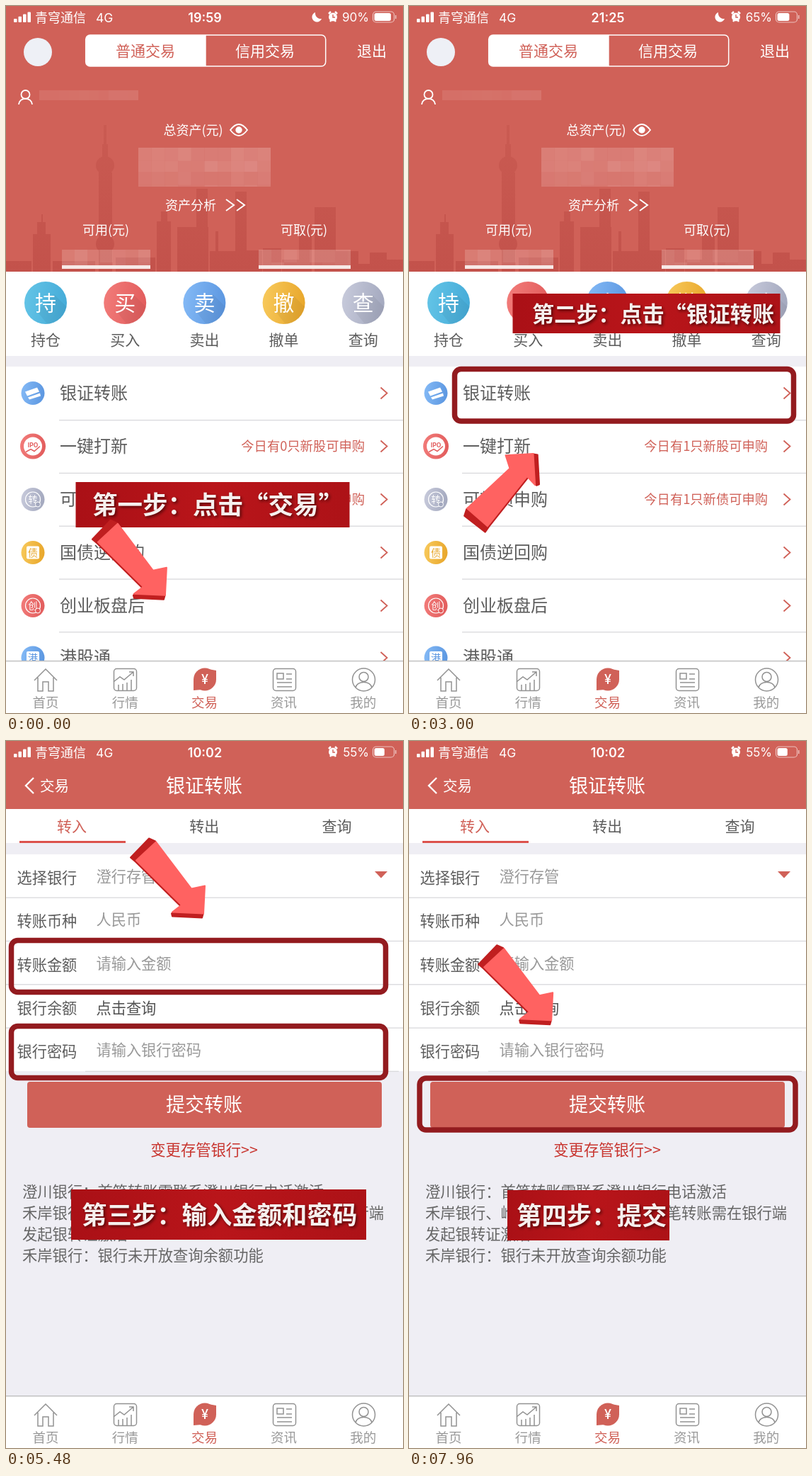
An HTML page with a canvas that plays this animation: 561 px wide and 998 px high, repeating every 8000 ms.

```html
<!DOCTYPE html>
<html lang="zh-CN">
<head>
<meta charset="utf-8">
<style>
html, body { margin: 0; width: 100%; height: 100%; overflow: hidden; background: #fff; }
canvas { display: block; }
</style>
</head>
<body>
<canvas id="stage" width="561" height="998"></canvas>
<script>
const c = document.getElementById('stage').getContext('2d');
const CJK = '"Noto Sans CJK SC", "Noto Sans CJK", sans-serif';
const LATIN = 'Inter, sans-serif';
const RED = '#d06158', GREY = '#efeef4', INK = '#5c5c5c', PALE = '#999', LINE = '#d9d9dc';

// ---- helpers ----
function text(s, x, y, size, color, align = 'left', weight = 400, family = CJK) {
  c.font = `${weight} ${size}px ${family}`;
  c.fillStyle = color;
  c.textAlign = align;
  c.fillText(s, x, Math.round(y + size * 0.375));
}
function rect(x, y, w, h, color) {
  c.fillStyle = color;
  c.fillRect(x, y, w, h);
}
function roundRect(x, y, w, h, r, fill, stroke, width = 1.5) {
  c.beginPath();
  c.roundRect(x, y, w, h, r);
  paint(fill, stroke, width);
}
function circle(x, y, r, fill, stroke, width = 1.5) {
  c.beginPath();
  c.arc(x, y, r, 0, 7);
  paint(fill, stroke, width);
}
function poly(points, fill, stroke, width = 1.5) {
  c.beginPath();
  for (let i = 0; i < points.length; i += 2) c.lineTo(points[i], points[i + 1]);
  if (fill) c.closePath();
  paint(fill, stroke, width);
}
function shape(d, fill, stroke, width = 1.5) {
  const p = new Path2D(d);
  if (fill) { c.fillStyle = fill; c.fill(p); }
  if (stroke) { c.strokeStyle = stroke; c.lineWidth = width; c.stroke(p); }
}
function paint(fill, stroke, width) {
  if (fill) { c.fillStyle = fill; c.fill(); }
  if (stroke) { c.strokeStyle = stroke; c.lineWidth = width; c.stroke(); }
}
function chevron(x, y, w, h, color, width = 1.8) {
  poly([x, y - h, x + w, y, x, y + h], null, color, width);
}
function mosaic(x, y, w, h, size, strength) {
  for (let j = 0; j * size < h; j++)
    for (let i = 0; i * size < w; i++) {
      const n = Math.abs(Math.sin(i * 12.9 + j * 78.2 + x) * 437.5) % 1;
      rect(x + i * size, y + j * size, Math.min(size, w - i * size), Math.min(size, h - j * size),
        `rgba(255,240,238,${strength * (0.7 + n * 0.4)})`);
    }
}
function badge(x, y, r, from, to) {
  const g = c.createLinearGradient(x - r, y, x + r, y + r * 0.3);
  g.addColorStop(0, from);
  g.addColorStop(1, to);
  circle(x, y, r, g);
}

// ---- shared chrome ----
function statusBar(time, percent, moon) {
  for (let i = 0; i < 4; i++) roundRect(11 + i * 6.5, 18 - i * 3.2, 4.5, 5 + i * 3.2, 1, '#fff');
  text('青穹通信', 41, 16, 18, '#fff');
  text('4G', 127, 16, 17.5, '#fff', 'left', 400, LATIN);
  text(time, 281, 16, 18, '#fff', 'center', 600, LATIN);
  if (moon) shape('M437 9A7 7 0 1 0 446 18A8 8 0 0 1 437 9Z', '#fff');
  circle(462, 15.5, 6, '#fff');
  shape('M456 11l3-3M468 11l-3-3M458 22l1.5-2M466 22l-1.5-2', null, '#fff', 2.5);
  shape('M462 12v4h3', null, RED, 1.4);
  text(percent + '%', 513, 16, 17, '#fff', 'right', 400, LATIN);
  roundRect(518.5, 8, 30, 15, 4.5, null, 'rgba(255,255,255,.6)', 1.2);
  roundRect(520.5, 10, 26 * percent / 100, 11, 2.5, '#fff');
  rect(550, 13, 1.5, 5, 'rgba(255,255,255,.6)');
}
function tabBar() {
  rect(0, 925, 561, 73, '#fff');
  rect(0, 924, 561, 1.3, '#bbb');
  ['首页', '行情', '交易', '资讯', '我的'].forEach((s, i) =>
    text(s, 56 + i * 112.2, 983, 18.5, i == 2 ? RED : PALE, 'center', i == 2 ? 500 : 400));
  const g = '#929292';
  shape('M40 952L56 936L72 952M45 948V967H52V954H60V967H67V948', null, g);
  roundRect(152.5, 935.5, 32, 31, 4, null, g);
  shape('M152 954l9-7 6 4 13-11M174 940h6v6M159 966v-8M165 966v-9M171 966v-11M177 966v-15', null, g);
  shape('M265 951V966L277 965ZM297 951V938L286 936Z', RED);
  circle(281, 950.5, 16, RED);
  text('¥', 281, 950, 18, '#fff', 'center', 500, LATIN);
  roundRect(377.5, 935.5, 32, 31, 4, null, g);
  shape('M383 942h9v8h-9zM396 943h8M396 950h8M383 955h21M383 961h21', null, g);
  circle(505.5, 951, 16, null, g);
  circle(505.5, 947, 6.5, null, g);
  shape('M494 962C496 952 515 952 517 962', null, g);
}

// ---- trade home ----
const skyline = [0, 360, 36, 38, 322, 25, 44, 305, 12, 50, 294, 2, 66, 360, 60, 138, 168, 4,
  136, 195, 8, 131, 235, 19, 155, 355, 56, 213, 304, 20, 219, 290, 9, 242, 312, 44,
  269, 258, 16, 288, 346, 38, 296, 318, 4, 324, 262, 16, 340, 345, 22, 363, 342, 26, 390, 358, 24,
  414, 310, 18, 436, 284, 30, 466, 346, 32, 498, 364, 18, 514, 348, 24, 538, 358, 23];

function header() {
  rect(0, 0, 561, 375, RED);
  const shade = c.createLinearGradient(0, 160, 0, 375);
  shade.addColorStop(0, '#ca5b52');
  shade.addColorStop(1, '#c3524b');
  for (let i = 0; i < skyline.length; i += 3)
    rect(skyline[i], skyline[i + 1], skyline[i + 2], 375 - skyline[i + 1], shade);
  circle(140, 225, 13, shade);
  circle(140, 336, 13, shade);

  circle(45, 65, 20, '#eef0f6');
  roundRect(112.7, 41, 339, 44, 6, null, '#fff');
  roundRect(112.7, 41, 170, 44, [6, 0, 0, 6], '#fff');
  text('普通交易', 197, 63, 21, RED, 'center');
  text('信用交易', 366, 63, 21, '#fff', 'center');
  text('退出', 517, 63, 21, '#fff', 'center');

  circle(27.5, 125, 6, null, '#fff', 1.8);
  shape('M18 139C19 128 36 128 37 139', null, '#fff', 1.8);
  mosaic(47, 119, 140, 14, 14, 0.13);
  text('总资产(元)', 264.5, 175, 18, '#fff', 'center');
  shape('M317 175Q329 159 341 175Q329 191 317 175Z', null, '#fff', 1.8);
  circle(329, 175, 4.7, '#fff');
  mosaic(187, 200, 187, 34, 18.7, 0.25);
  mosaic(187, 234, 187, 21, 18.7, 0.2);
  text('资产分析', 261, 281, 18, '#fff', 'center');
  chevron(311, 281, 11, 8, '#fff', 2);
  chevron(326, 281, 11, 8, '#fff', 2);
  text('可用(元)', 141, 316, 18, '#fff', 'center');
  text('可取(元)', 421, 316, 18, '#fff', 'center');
  for (const [x, w] of [[79, 125], [357, 130]]) {
    mosaic(x, 344, w, 22, 18, 0.22);
    rect(x, 366, w, 5, '#f7e9e7');
  }
}
const actions = [
  ['持', '持仓', '#62c3e6', '#45abd8'], ['买', '买入', '#f17a78', '#e25c5c'],
  ['卖', '卖出', '#82b8f5', '#5b96e0'], ['撤', '撤单', '#f7c85a', '#e8a62a'],
  ['查', '查询', '#c6c9da', '#a3a8be']];
const rows = [
  ['银证转账', '', 2], ['一键打新', 'IPO', 1], ['可转债申购', '转', 4],
  ['国债逆回购', '债', 3], ['创业板盘后', '创', 1], ['港股通', '港', 2]];

function homePage(time, percent, count) {
  rect(0, 374, 561, 624, '#fff');
  header();
  statusBar(time, percent, true);
  actions.forEach(([glyph, label, from, to], i) => {
    const x = 56 + i * 112.2;
    badge(x, 419, 30, from, to);
    c.save();
    c.clip();
    poly([x + 12, 407, x + 42, 437, x + 15, 465, x - 12, 431], 'rgba(0,0,0,.05)');
    c.restore();
    text(glyph, x, 419, 30, '#fff', 'center', 500);
    text(label, x, 471, 21, INK, 'center');
  });
  rect(0, 494, 561, 15, GREY);
  rows.forEach(([label, glyph, tone], i) => {
    const y = 546.5 + i * 75 - (i > 4 ? 1.5 : 0);
    const [, , from, to] = actions[tone];
    badge(38, y, glyph == 'IPO' ? 18 : 16.5, from, to);
    if (!glyph) {
      shape(`M27 ${y - 2}l17-6 3 6-17 6zM31 ${y + 6}l17-6 1 4-16 5z`, '#fff');
    } else if (glyph == 'IPO') {
      circle(38, y, 13, '#fff');
      text(glyph, 38, y - 2, 8.5, to, 'center', 700, LATIN);
      shape(`M28 ${y + 8}l7-4 5 3 8-7`, null, to);
    } else if (tone > 1 && tone < 4) {
      roundRect(29, y - 9, 18, 18, 2, '#fff');
      text(glyph, 38, y, 14, to, 'center', 500);
    } else {
      circle(38, y, 10.5, null, '#fff', 1.2);
      text(glyph, 38, y, 13, '#fff', 'center');
      circle(45, y + 7, 3.5, to, '#fff', 1);
    }
    text(label, 76, y - 0.6, 24, INK);
    chevron(529.5, y, 9, 8, RED);
    rect(75, 584 + i * 74.8, 486, 1.3, LINE);
  });
  text(`今日有${count}只新股可申购`, 507, 621, 18.3, RED, 'right');
  text(`今日有${count}只新债可申购`, 507, 696, 18.3, RED, 'right');
  tabBar();
}

// ---- transfer form ----
const fields = [
  ['选择银行', '澄行存管'], ['转账币种', '人民币'], ['转账金额', '请输入金额'],
  ['银行余额', '点击查询'], ['银行密码', '请输入银行密码']];
const notes = [
  '澄川银行：首笔转账需联系澄川银行电话激活',
  '禾岸银行、岭桥银行、砚湖银行：首笔转账需在银行端',
  '发起银转证激活',
  '禾岸银行：银行未开放查询余额功能'];

function formPage() {
  rect(0, 0, 561, 998, GREY);
  rect(0, 0, 561, 96, RED);
  statusBar('10:02', 55, false);
  chevron(39, 63, -11, 11, '#fff', 2.4);
  text('交易', 48, 63, 20.5, '#fff');
  text('银证转账', 280, 63, 27, '#fff', 'center');
  rect(0, 96, 561, 48, '#fff');
  ['转入', '转出', '查询'].forEach((s, i) =>
    text(s, 93 + i * 187.3, 120, 21, i ? INK : RED, 'center'));
  rect(19, 141, 150, 3, '#dc524c');
  rect(0, 160, 561, 306, '#fff');
  fields.forEach(([label, value], i) => {
    const y = 193 + i * 61.3;
    text(label, 15.5, y, 21.2, INK);
    text(value, 127.5, y - (i == 3 ? 0 : 2), 21.2, i == 3 ? '#505050' : PALE);
    rect(i < 4 ? 0 : 112, 220.5 + i * 61.3, i < 4 ? 561 : 443, 1.3, LINE);
  });
  poly([521, 184, 539, 184, 530, 193.5], RED);
  roundRect(30, 481, 501, 65, 4, RED);
  text('提交转账', 280, 513, 27, '#fff', 'center');
  text('变更存管银行>>', 280, 577, 21.3, '#c8352f', 'center');
  notes.forEach((s, i) => text(s, 23, 636 + i * 30, 21.3, '#666'));
  tabBar();
}

// ---- overlays ----
function banner(x, y, w, h, s, textX, size) {
  const g = c.createLinearGradient(x, y, x + w, y);
  g.addColorStop(0, '#aa1016');
  g.addColorStop(0.5, '#b9151a');
  g.addColorStop(1, '#ad1217');
  rect(x, y, w, h, g);
  c.save();
  c.shadowColor = 'rgba(50,0,0,.75)';
  c.shadowBlur = 4;
  c.shadowOffsetX = c.shadowOffsetY = 2;
  text(s, textX, y + h / 2, size, '#f6f0ee', 'left', 700);
  c.restore();
}
function ring([x, y, w, h], progress) {
  if (progress <= 0) return;
  const r = 9, right = x + w, bottom = y + h;
  const length = 2 * (w + h) - 8 * r + 2 * Math.PI * r;
  c.save();
  c.beginPath();
  c.moveTo(right, y + r);
  c.arcTo(right, bottom, x, bottom, r);
  c.arcTo(x, bottom, x, y, r);
  c.arcTo(x, y, right, y, r);
  c.arcTo(right, y, right, bottom, r);
  if (progress < 1) c.setLineDash([length * progress, length * 2]);
  else c.closePath();
  paint(null, '#931b1f', 7.5);
  c.restore();
}
function arrow(x, y, angle) {
  c.save();
  c.translate(x, y);
  c.rotate(angle * Math.PI / 180);
  c.lineJoin = 'round';
  poly([-53, -29, -27, -56, -18, -52, 20, 5, 50, 49, 48, 56, 6, 54, 5, 50, 18, 40, -46, -23],
    '#c01f20', '#c01f20', 2);
  poly([-45, -25, -17, -51, 33, 15, 52, 11, 50, 50, 6, 48, 19, 38], '#ff6261', '#ff6261', 2);
  c.restore();
}

const clamp = v => Math.max(0, Math.min(1, v));
// Advance of the arrow (0 back, 1 forward) within one two-second step.
function push(t) {
  if (t < 370) return 0.1 + 0.9 * t / 370;
  if (t < 600) return 1 - clamp((t - 370) / 190);
  const u = (t - 600) % 1280;
  const ease = v => clamp(v / 400) ** 1.3;
  return u < 640 ? ease(u) : 1 - ease(u - 640);
}

const steps = [
  { page: () => homePage('19:59', 90, 0), rings: [[240, 930, 82, 64]],
    banner: [98.5, 672, 387, 64, '第一步：点击“交易”', 122, 35.5], from: [170, 776], to: [219, 834], angle: 0 },
  { page: () => homePage('21:25', 65, 1), rings: [[64.5, 512.5, 479, 73.5]],
    banner: [146.5, 406, 378, 56, '第二步：点击“银证转账', 174, 31.1], from: [93, 729], to: [131, 687], angle: -96 },
  { page: formPage, rings: [[7.5, 281.5, 529, 73], [7.5, 402.5, 529, 73]],
    banner: [92, 633, 417, 71, '第三步：输入金额和密码', 107, 35.4], from: [213, 177], to: [246, 211], angle: 0 },
  { page: formPage, rings: [[15, 476, 531, 73]],
    banner: [139, 634, 229, 71, '第四步：提交', 152, 35.4], from: [147, 340], to: [181, 374], angle: 0 }];

function draw(now) {
  const time = now % 8000, t = time % 2000;
  const step = steps[Math.floor(time / 2000)];
  step.page();
  banner(...step.banner);
  for (const r of step.rings) ring(r, clamp((t - 40) / 508));
  const p = push(t), [x0, y0] = step.from, [x1, y1] = step.to;
  arrow(x0 + (x1 - x0) * p, y0 + (y1 - y0) * p, step.angle);
}
let start;
function tick(now) {
  start ??= now;
  draw(now - start);
  requestAnimationFrame(tick);
}
draw(0);
requestAnimationFrame(tick);
</script>
</body>
</html>
```
